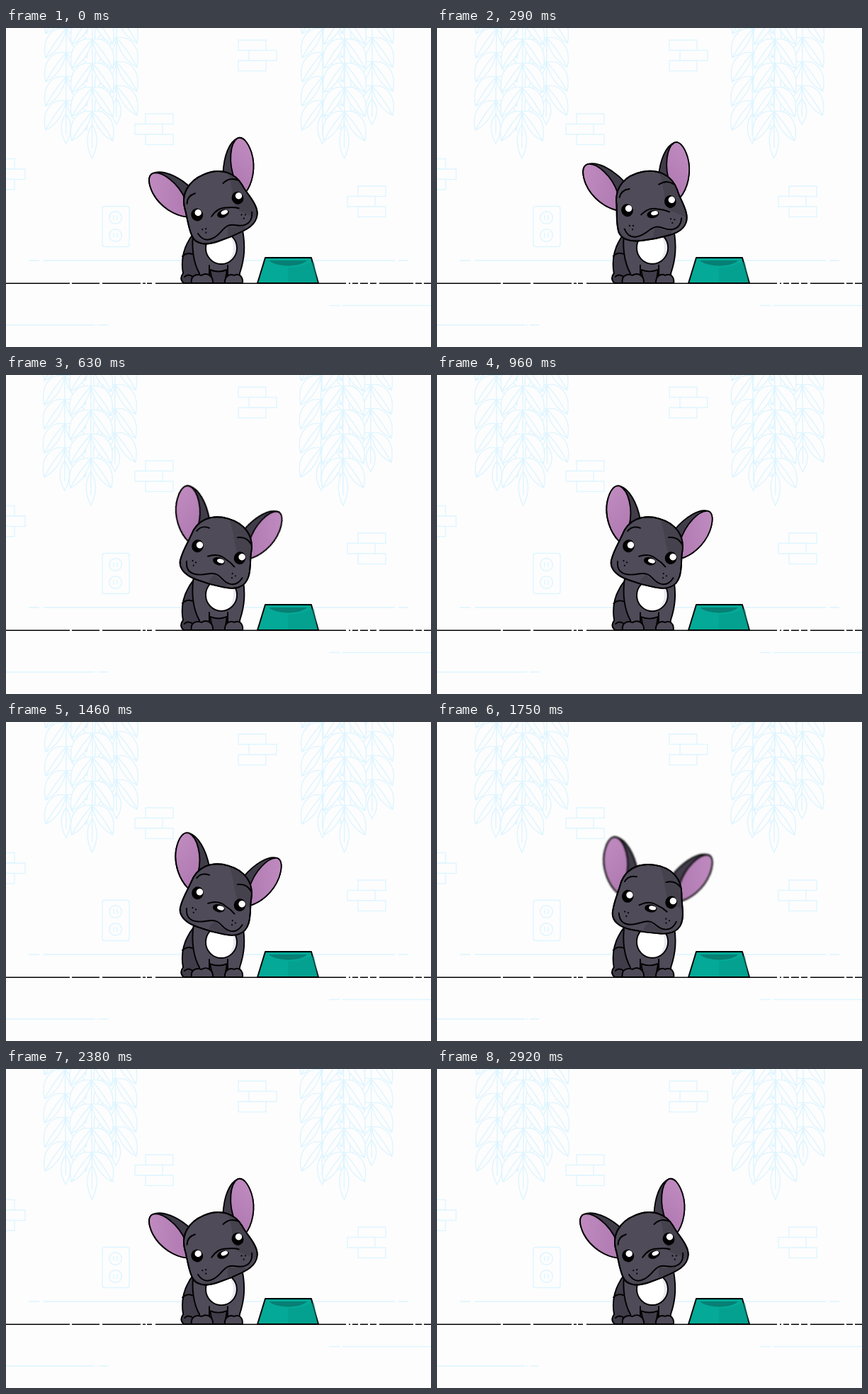
Animation of 600 by 450 pixels, one loop 2.96 s. Source, as an HTML page:

```html
<!DOCTYPE html>
<html lang="en">
<head>
<meta charset="utf-8">
<title>Puppy</title>
<style>
html, body { margin: 0; width: 100%; height: 100%; overflow: hidden; background: #fdfdfd; }
svg { display: block; width: 600px; height: 450px; }
.wall { fill: #fdfdfd; stroke: #def5ff; stroke-width: 1.4; }
.ink { stroke: #000; stroke-width: 1.9; stroke-linecap: round; stroke-linejoin: round; }
.line { fill: none; }
.fur { fill: #4f4b59; }
.dark { fill: #403c49; }
#ground { stroke-width: 1.6; stroke-linecap: butt; }
</style>
</head>
<body>
<svg viewBox="0 0 600 450">
  <defs>
    <linearGradient id="pink" x1="0" y1="0" x2="1" y2="1">
      <stop offset="0" stop-color="#c08cc0"/><stop offset="1" stop-color="#ae78b0"/>
    </linearGradient>
    <path id="skull" d="M0-49C25-49 41-35 44-14C45-2 50 8 50 21C50 38 37 45 20 46C8 47-6 47-18 46C-36 45-50 38-49 23C-49 10-46 2-44-12C-42-35-25-49 0-49Z"/>
    <clipPath id="skullClip"><use href="#skull"/></clipPath>
    <clipPath id="chestClip"><ellipse cx="304" cy="310.5" rx="22" ry="22.5"/></clipPath>
    <g id="ear">
      <path class="dark" d="M-44-2C-60-10-75-30-77-52C-78-68-74-78-66-78C-52-78-36-62-25-40L-30-10Z"/>
      <path fill="url(#pink)" d="M-44-2C-60-10-75-30-77-52C-78-68-74-78-66-78C-53-76-38-52-38-25Z"/>
    </g>
  </defs>

  <g id="wall" class="wall">
    <path d="M32 328H47M53 328H549M554 328H568M456 391.5H471M475 391.5H600M0 419H124M126 419H128M131 419H144"/>
    <rect x="136" y="251.5" width="38" height="57" rx="3"/>
    <circle cx="154.5" cy="267.5" r="8.8"/><circle cx="154.5" cy="292.5" r="8.8"/>
    <path d="M152 264V271M157 264V271M152 289V296M157 289V296"/>
  </g>

  <g class="ink">
    <path fill="#04a997" d="M366 324H431L441 360H355Z"/>
    <path fill="#059a8a" stroke="none" d="M398 338Q418 337 429 331L435 330L440 359H398Z" opacity=".5"/>
    <path fill="#077f74" stroke="none" d="M371 328H425Q418 335 398 335.5Q379 335 371 328Z"/>
  </g>

  <g id="body" class="ink">
    <path class="dark" d="M266 288C253 304 246 324 250 346Q244 354 251 360H300V288Z"/>
    <path class="line" d="M249 322Q255 316 263 319M252 351Q257 346 264 351"/>
    <path class="fur" d="M265 285C261 310 265 332 273 346L272 360H330V346C337 325 338 308 334 285Z"/>
    <g clip-path="url(#chestClip)" stroke="none">
      <rect x="280" y="286" width="50" height="50" fill="#e8e8ee"/>
      <ellipse cx="301" cy="310" rx="20" ry="24" fill="#fff"/>
    </g>
    <ellipse class="line" cx="304" cy="310.5" rx="22" ry="22.5"/>
    <path class="dark" d="M288 341Q300 346 312 341L309 360H292Z"/>
    <path class="line" d="M287 335V352M313 335V352"/>
    <path class="fur" d="M262 360C260 350 268 346 276 349C284 344 293 350 292 360ZM309 360C308 350 316 346 322 349C330 345 335 352 334 360Z"/>
  </g>

  <g id="head" class="ink">
    <g id="earL"><use href="#ear"/></g>
    <g id="earR"><use href="#ear" transform="translate(2) scale(-.93 1)"/></g>
    <use href="#skull" class="fur"/>
    <g clip-path="url(#skullClip)" class="dark" stroke="none" opacity=".75">
      <path id="shade" d="M9-56C24-38 19-6 30 6L62 20V-60Z" opacity=".8"/>
      <path d="M4 32Q-4 40-2 52H28Q22 42 26 40Q14 39 4 32Z"/>
      <path d="M-50 14Q-47 40-22 42L-20 52H-54Z" opacity=".5"/>
    </g>
    <use href="#skull" class="line"/>
    <path class="line" d="M-38-20Q-34-30-22-29M20-27Q32-32 41-23M-13 10Q0 1 12 7Q20 9 27 14M-40 25C-38 36-31 40-22 39C-11 38-5 31 4 31C13 31 16 39 27 39Q38 39 42 26"/>
    <g stroke="none">
      <ellipse cx="-31" rx="8.3" ry="9"/><ellipse cx="31" rx="8.3" ry="9"/>
      <ellipse cx="3.6" cy="12.5" rx="8.6" ry="5.5"/>
      <g fill="#fff">
        <circle cx="-28.5" cy="-2.2" r="4.7"/><circle cx="33.5" cy="-2.2" r="4.7"/>
        <ellipse cx="6" cy="11.5" rx="5" ry="2.9"/>
      </g>
      <g id="dots"></g>
    </g>
  </g>

  <path id="ground" class="ink line" d="M0 360.3H90M93 360.3H132M136 360.3H190M193 360.3H197M199 360.3H206M211 360.3H480M484 360.3H486M489 360.3H497M500 360.3H511M514 360.3H523M527 360.3H575M578 360.3H587M590 360.3H600"/>
</svg>
<script>
const LOOP = 2960;
const $ = id => document.getElementById(id);
const add = (parent, tag, attrs) => {
  const el = document.createElementNS('http://www.w3.org/2000/svg', tag);
  for (const k in attrs) el.setAttribute(k, attrs[k]);
  return parent.appendChild(el);
};

// Brick groups: x, y and the shift of the middle brick.
for (const [x, y, shift] of [[328, 17, 15], [197, 121, -15], [-27, 184.5, 15], [497, 223, -15]])
  for (let i = 0; i < 3; i++)
    add($('wall'), 'rect', { x: x + i % 2 * shift, y: y + i * 14.5, width: 39, height: 14.5 });

for (const [x, y] of [[-32, 22], [-27, 23], [-29, 28], [27, 24], [32, 26], [28, 30]])
  add($('dots'), 'circle', { cx: x, cy: y, r: 1.1 });

// Hanging plants: rows of paired leaves on three stems, each row swaying on its own.
const rows = [];
const leaf = s => `M0 0C${-20 * s}-4 ${-35 * s} 14 ${-29 * s} 41C${-19 * s} 37 ${-4 * s} 23 0 0Q${-14 * s} 14 ${-29 * s} 41`;
function vine(x, bottom, tip) {
  const row = (y, d) => rows.push({ x, y, el: add($('wall'), 'path', { d }) });
  row(bottom, `M0 0C-9 ${tip * .3}-9 ${tip * .62} 0 ${tip}C9 ${tip * .62} 9 ${tip * .3} 0 0ZV${tip * .7}`);
  for (let y = bottom - 18; y > -60; y -= 34) row(y, 'M0-18V18' + leaf(1) + leaf(-1));
}
for (const [left, mid, right] of [[84, 121, 155], [446, 477, 516]]) {
  vine(left, 121, 42);
  vine(right, 100, 36);
  vine(mid, 136, 48);
}

const tilt = [[0, -22.5], [200, -22.5], [460, 17], [660, 15.8], [1670, 15.8], [1960, -25.5], [2160, -22.5], [LOOP, -22.5]];
const lag = [[0, 0], [200, 0], [270, -8], [370, -10], [460, -4], [560, 2.5], [680, 0],
  [1670, 0], [1760, 9], [1850, 11], [1960, -1], [2060, -2], [2180, 0], [LOOP, 0]];

function ease(keys, t) {
  const i = Math.max(1, keys.findIndex(k => k[0] >= t));
  const [t0, a] = keys[i - 1], [t1, b] = keys[i];
  const p = (t - t0) / (t1 - t0);
  return a + (b - a) * p * p * (3 - 2 * p);
}

function draw(now) {
  const t = now % LOOP, w = t / 1480 * 2 * Math.PI;
  for (const { x, y, el } of rows) {
    const dx = (1 + y / 260) * Math.cos(w + .3 + y / 150);
    el.setAttribute('transform', `translate(${x + dx} ${y})`);
  }
  const b = Math.sin(w);
  $('body').setAttribute('transform', `translate(292 360) scale(${1 + .006 * b} ${1 + .01 * b}) translate(-292 -360)`);

  const a = ease(tilt, t), e = ease(lag, t);
  $('head').setAttribute('transform', `translate(${299.5 + .05 * a} ${250.5 - .05 * a}) rotate(${a})`);
  $('shade').setAttribute('transform', `rotate(${-a})`);
  $('earL').setAttribute('transform', `rotate(${e * .8} -42 -15)`);
  $('earR').setAttribute('transform', `rotate(${e * 1.1} 42 -15)`);
  const speed = Math.abs(ease(lag, Math.min(t + 20, LOOP)) - ease(lag, Math.max(t - 20, 0)));
  const blur = speed > .8 ? `blur(${Math.min(1.3, speed * .4)}px)` : 'none';
  $('earL').style.filter = $('earR').style.filter = blur;
}

const start = performance.now();
function frame() {
  draw(performance.now() - start);
  requestAnimationFrame(frame);
}
frame();
</script>
</body>
</html>
```
